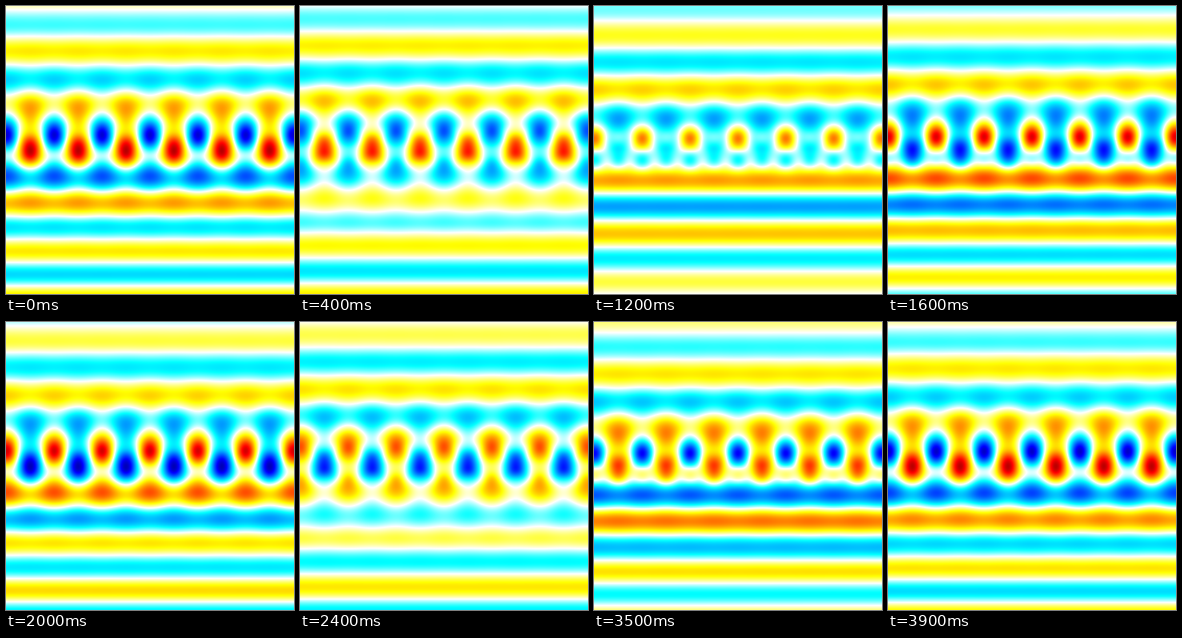
Recreate the animation shown at these times as a matplotlib script. Size 360 px wide and 360 px high, loop 4000 ms.

```python
import numpy as np
import matplotlib.pyplot as plt
from matplotlib.animation import FuncAnimation
from matplotlib.colors import LinearSegmentedColormap

SIZE, FRAMES, CELLS = 360, 40, 6

cmap = LinearSegmentedColormap.from_list("wave", [
    (0, (0, 0, 0.5)), (0.125, (0, 0, 1)), (0.375, (0, 1, 1)), (0.5, (1, 1, 1)),
    (0.625, (1, 1, 0)), (0.875, (1, 0, 0)), (1, (0.5, 0, 0))], N=1024)


def ripple(y, peaks, values):
    """Join successive crests and troughs with half cosines."""
    peaks, values = np.array(peaks), np.array(values)
    i = np.clip(np.searchsorted(peaks, y, side="right") - 1, 0, len(peaks) - 2)
    s = (y - peaks[i]) / (peaks[i + 1] - peaks[i])
    return values[i] + (values[i + 1] - values[i]) * (1 - np.cos(np.pi * s)) / 2


def bump(y, center):
    return np.exp(-((y - center) / 10) ** 2)


def near_field(y, center, decay, core):
    return np.exp(-decay * (np.hypot(y - center, core) - core))


y = np.arange(SIZE, dtype=float)
x = 2 * np.pi * CELLS * np.arange(SIZE) / (SIZE - 1)
modes = [np.cos(n * x) for n in range(3)]

# Vertical profiles of the lateral modes, in phase and in quadrature
in_phase = [
    ripple(y,
           [-11, 23, 56, 91, 124, 157, 184, 214, 246, 276, 306, 335, 363],
           [.14, -.19, .285, -.30, .28, -.17, .31, -.45, .41, -.29, .29, -.32, .30]),
    -0.68 * near_field(y, 168, 0.044, 12),
    0.07 * (bump(y, 184) - bump(y, 158)),
]
d = y - 180.5
quadrature = [
    ripple(y,
           [-26, 7, 40, 73, 107, 141, 167, 193, 219, 252, 287, 318, 349, 381],
           [.10, -.15, .24, -.29, .31, -.30, .08, -.10, .32, -.34, .33, -.26, .17, -.15]),
    -0.0283 * d * np.exp(-np.hypot(d, 3) / 12.6),
    0.085 * (bump(y, 166) - bump(y, 194)),
]


def combine(profiles):
    return sum(np.outer(p, m) for p, m in zip(profiles, modes))


cos_part, sin_part = combine(in_phase), combine(quadrature)


def field(frame):
    phase = 2 * np.pi * frame / FRAMES
    return cos_part * np.cos(phase) + sin_part * np.sin(phase)


fig = plt.figure(figsize=(3.6, 3.6), dpi=100)
ax = fig.add_axes([0, 0, 1, 1])
ax.axis("off")
image = ax.imshow(field(0), cmap=cmap, vmin=-1, vmax=1,
                  interpolation="nearest", aspect="auto")


def update(frame):
    image.set_data(field(frame))
    return [image]


anim = FuncAnimation(fig, update, frames=FRAMES, interval=100,
                     repeat=True, repeat_delay=0)
plt.show()
```
